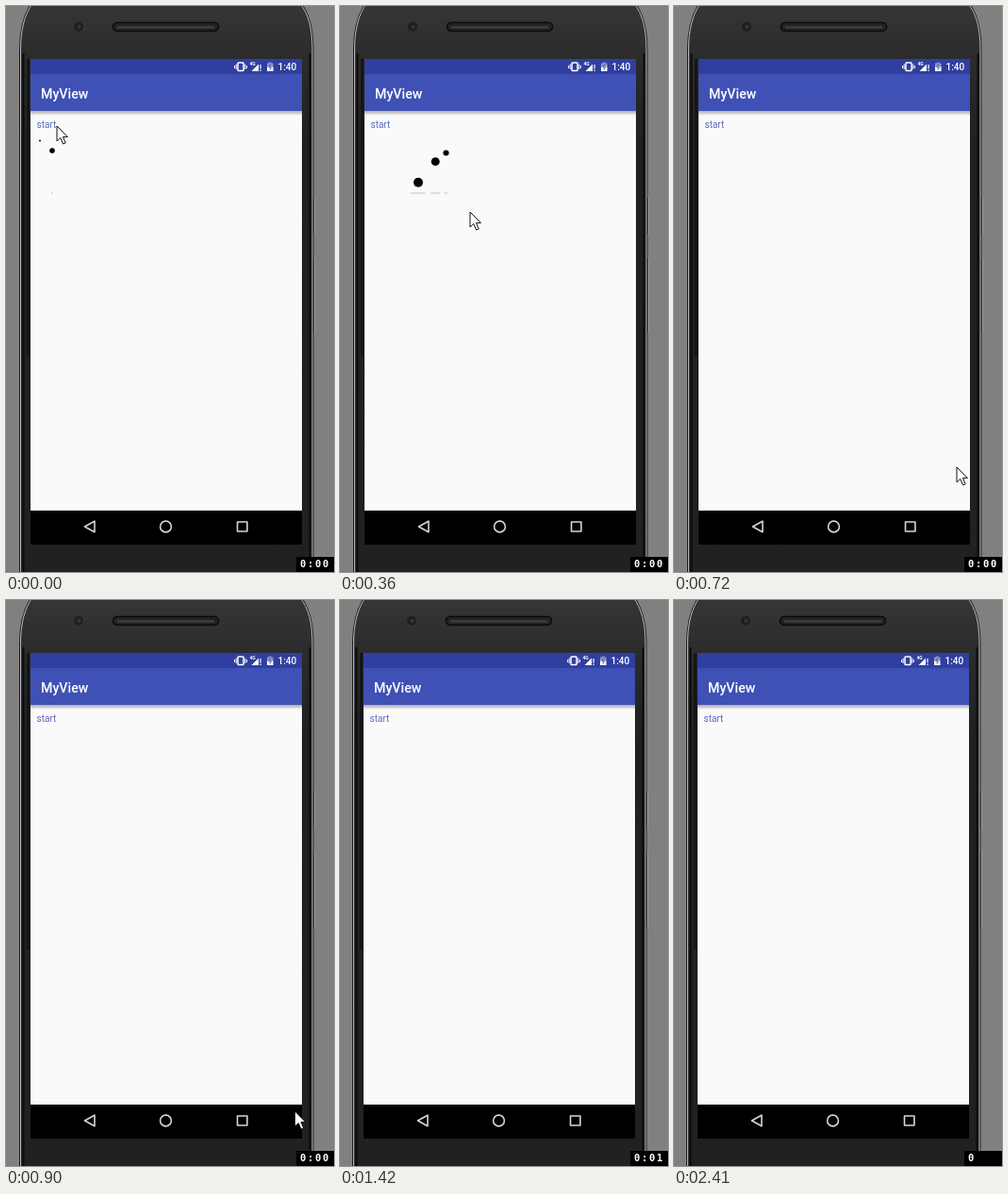
Write an HTML page that moves like this. It is 348 by 599 pixels and loops after 2450 ms.

```html
<!DOCTYPE html>
<html lang="en">
<head>
<meta charset="utf-8">
<title>MyView</title>
<style>
  html, body { margin: 0; width: 100%; height: 100%; overflow: hidden; background: #808080; }
  svg { display: block; width: 348px; height: 599px; }
  text { font-family: Roboto, sans-serif; fill: #fff; }
  #clock { font: bold 10.5px "DejaVu Sans Mono", monospace; letter-spacing: 1.7px; }
  .nav { fill: none; stroke: #d6d6d6; stroke-width: 1.6; stroke-linejoin: round; }
</style>
</head>
<body>
<svg viewBox="0 0 348 599">
  <defs>
    <linearGradient id="body" x2="0" y2="1">
      <stop offset="0" stop-color="#363636"/>
      <stop offset=".1" stop-color="#2b2b2b"/>
      <stop offset=".25" stop-color="#202020"/>
      <stop offset="1" stop-color="#212121"/>
    </linearGradient>
    <linearGradient id="drop" x2="0" y2="1">
      <stop offset="0" stop-color="#000" stop-opacity=".32"/>
      <stop offset="1" stop-color="#000" stop-opacity="0"/>
    </linearGradient>
    <path id="shell" d="M28-3C20 9 15.5 24 15.5 46V602H325V46C325 24 321 9 312-3Z"/>
  </defs>
  <rect width="348" height="599" fill="#808080"/>

  <g id="phone">
    <g fill="#3a3a3a" stroke="#b4b4b4" stroke-width=".8">
      <rect x="324" y="202" width="3.4" height="40" rx="1"/>
      <rect x="324" y="266" width="3.4" height="81" rx="1"/>
    </g>
    <use href="#shell" fill="#1c1c1c" stroke="#1c1c1c" stroke-width="3"/>
    <use href="#shell" fill="url(#body)" stroke="#bdbdbd" stroke-width="1"/>
    <path d="M18.5 50V599M322.5 50V599" stroke="#0c0c0c" stroke-width="2"/>
    <path d="M23.5 56V370" stroke="#151515" stroke-width="3"/>
    <rect x="113.5" y="17.5" width="112" height="9" rx="4.5" fill="#232323" stroke="#0b0b0b" stroke-width="1.6"/>
    <path d="M118 22.5H221" stroke="#434343" stroke-width="2"/>
    <circle cx="77" cy="22" r="5" fill="#1f1f21"/>
    <circle cx="77.5" cy="22" r="2" fill="#30334c"/>

    <rect x="26" y="56" width="288" height="514" fill="#fafafa"/>
    <rect x="26" y="111" width="288" height="5" fill="url(#drop)"/>
    <rect x="26" y="56" width="288" height="16" fill="#303f9f"/>
    <rect x="26" y="72" width="288" height="39" fill="#3f51b5"/>
    <rect x="26" y="534" width="288" height="36" fill="#000"/>

    <g fill="none" stroke="#fff">
      <rect x="246" y="60" width="6" height="8.5" rx=".8" stroke-width="1.5"/>
      <path d="M244.2 61.5V67M253.8 61.5V67M242.6 63V66M255.4 63V66" stroke-width="1"/>
    </g>
    <text x="258.5" y="63" font-size="5" font-weight="700">4G</text>
    <path d="M260.5 69L268 61.5V69Z" fill="#fff"/>
    <path d="M270 62V66.5M270 67.5V69" stroke="#fff" stroke-width="1.2"/>
    <path d="M277 60.5H279V59.5H281.5V60.5H283.5V65H277Z" fill="#8c94c8"/>
    <path d="M277 64.5H283.5V69H277Z" fill="#fff"/>
    <path d="M280.8 61.5L278.8 65H281.5L279.8 67.8" fill="none" stroke="#303f9f" stroke-width=".8"/>
    <text x="288.5" y="68" font-size="10" font-weight="500">1:40</text>
    <text x="37" y="97.7" font-size="14.2" font-weight="500">MyView</text>
    <text x="32.5" y="129" font-size="10" style="fill:#5b69c0">start</text>

    <path class="nav" d="M83.5 551L94 545.2V556.8Z"/>
    <circle class="nav" cx="169.5" cy="551" r="5.9"/>
    <rect class="nav" x="245.5" y="546" width="10.4" height="10"/>
  </g>

  <g id="balls"></g>
  <path id="cursor" d="M0 0V16L3.8 12.6 6.6 19 9.2 17.9 6.5 11.6H11.4Z" fill="#fff" stroke="#111" stroke-width="1"/>
  <rect x="308" y="583" width="40" height="16" fill="#000"/>
  <text id="clock" x="312" y="594.4"></text>
</svg>
<script>
const LOOP = 2450;
const ticks = [0, 70, 130, 190, 240, 300, 360, 420, 480, 540, 600, 660, 720,
  780, 840, 900, 960, 1020, 1120, 1170, 1420, 1830, 1890, 1950, 2010, 2410];

// [time, x, y] of the pointer tip
const leave = [[0, 54, 127], [240, 56, 127], [300, 80, 152], [360, 138, 218],
  [420, 198, 285], [480, 244, 341], [540, 274, 398], [600, 286, 432],
  [660, 295, 463], [720, 300, 488], [840, 305, 526], [960, 308, 556], [1120, 310, 580]];
const peek = [[1830, 322, 575], [1890, 318.5, 570.5], [1950, 321, 577]];

// x of each ball over time
const tracks = [
  [[0, 49], [240, 91], [480, 134]],
  [[0, 36], [240, 78.5], [480, 124]],
  [[0, 17.5], [240, 61], [480, 105]]
];

const $ = id => document.getElementById(id);
const clamp = (v, lo, hi) => Math.min(hi, Math.max(lo, v));

// Linear between keys, carrying on past the last one
function along(keys, t, col) {
  let i = 1;
  while (i < keys.length - 1 && t > keys[i][0]) i++;
  const a = keys[i - 1], b = keys[i];
  return a[col] + (b[col] - a[col]) * (t - a[0]) / (b[0] - a[0]);
}

function add(tag, attrs) {
  const el = document.createElementNS("http://www.w3.org/2000/svg", tag);
  $("balls").append(el);
  return set(el, attrs);
}

function set(el, attrs) {
  for (const k in attrs) el.setAttribute(k, attrs[k]);
  return el;
}

const shadows = tracks.map(() => add("rect", { y: 197.5, height: 1, fill: "#c6c6c6" }));
const balls = tracks.map(() => add("circle", { fill: "#000" }));

// Falls along one curve, rebounds along another
function height(x) {
  if (x < 80) {
    const d = x - 30;
    return 139 + d * (0.515 + 0.0115 * d);
  }
  const u = Math.max(0, 136 - x);
  return 139 + u * (0.69 + 0.256 * (u / 56) ** 3.5);
}

function drawBalls(t) {
  tracks.forEach((keys, i) => {
    const x = along(keys, t, 1), y = height(x);
    const r = clamp(Math.min((x - 29) * 0.14, (137 - x) * 0.125), 0, 5);
    const w = r ? clamp((y - 150) * 0.35, 0, 7.8) : 0;
    set(balls[i], { cx: x, cy: y, r });
    set(shadows[i], { x: x - w, width: 2 * w });
  });
}

function drawCursor(t) {
  const path = t < 1170 ? leave : t >= 1830 && t < 2010 ? peek : null;
  $("cursor").style.display = path ? "" : "none";
  if (path) set($("cursor"), { transform: `translate(${along(path, t, 1)} ${along(path, t, 2)})` });
}

function draw(now) {
  const time = now % LOOP;
  const t = ticks.filter(k => k <= time).pop() || 0;
  drawBalls(t);
  drawCursor(t);
  set($("phone"), { transform: `translate(${t < 1420 ? 0 : -1} 0)` });
  $("clock").textContent = t >= 2410 ? "0" : "0:0" + Math.floor(t / 1000);
}

let start;
function frame(now) {
  start ??= now;
  draw(Math.max(0, now - start));
  requestAnimationFrame(frame);
}
draw(0);
requestAnimationFrame(frame);
</script>
</body>
</html>
```
